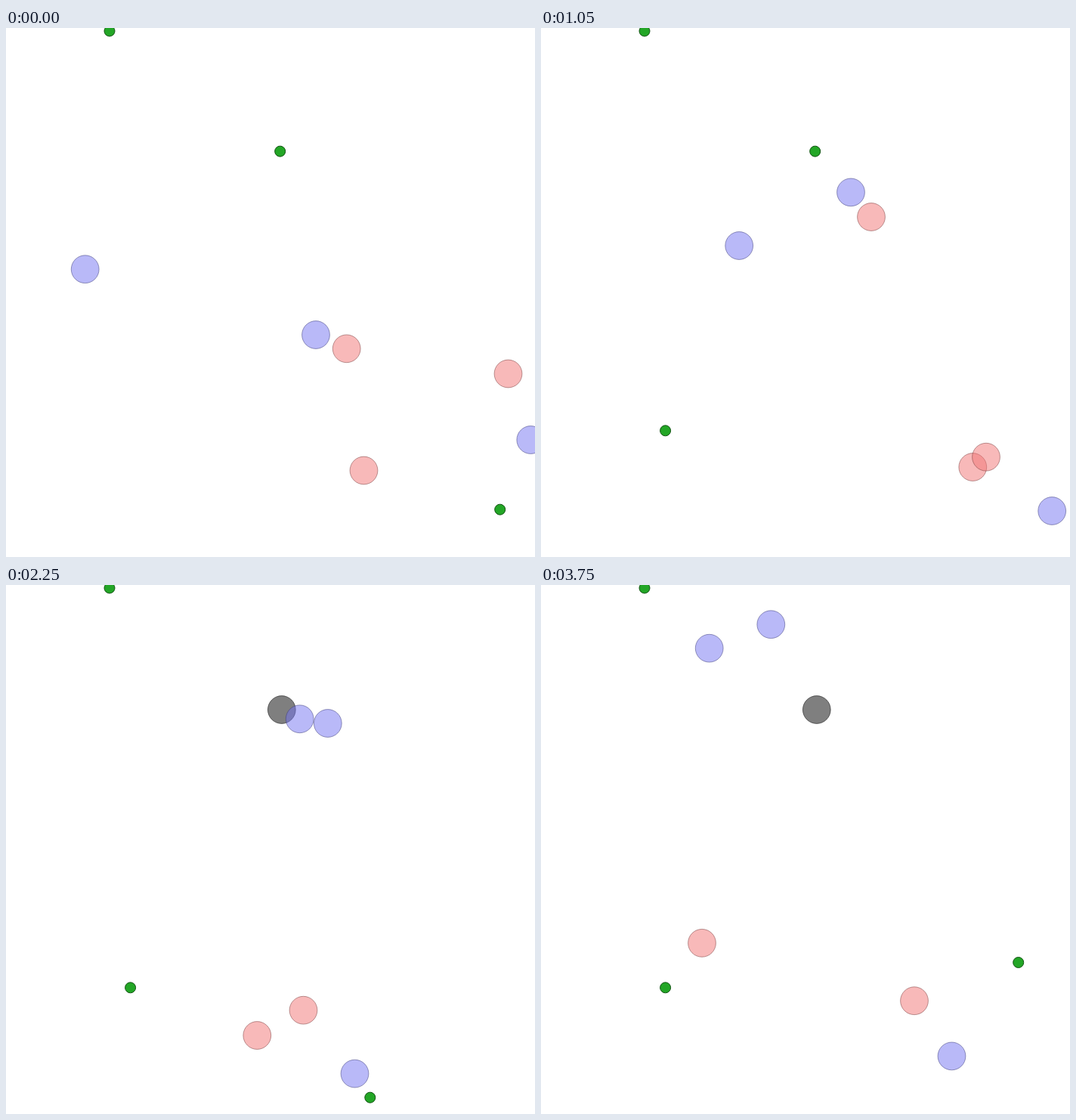
Recreate the animation shown at these times as an HTML page. Size 700x700 px, loop 3.9 s.

```html
<!DOCTYPE html>
<html lang="en">
<head>
<meta charset="utf-8">
<title>Agents and food</title>
<style>
html, body { margin: 0; width: 100%; height: 100%; overflow: hidden; background: #fff; }
svg { display: block; width: 100%; height: 100%; }
</style>
</head>
<body>
<svg id="stage" viewBox="0 0 700 700"></svg>
<script>
const STEP = 150, COUNT = 26, DRAG = 0.75;
const RED = [241, 117, 117], BLUE = [117, 117, 241], GREEN = [35, 166, 38], DEAD = [0, 0, 0];
const stage = document.getElementById('stage');

// Waypoints: [step, x, y]
const agents = [
  { color: RED, path: [[0, 473.5, 585.5], [4, 540, 589.5], [7, 571.3, 581], [11, 500, 580.5],
    [15, 393.5, 562.7], [21, 442.7, 563], [25, 494, 550.2]] },
  { color: RED, path: [[0, 664.5, 457.5], [4, 640.2, 523.5], [7, 589, 567.7], [11, 470.6, 590.3],
    [15, 332.3, 596], [21, 239, 526.7], [25, 213, 473.8]] },
  { color: RED, diesAt: 12, path: [[0, 450.7, 424.3], [4, 450, 333.2], [7, 437, 250], [11, 367, 179.7],
    [12, 364.8, 165]] },
  { color: BLUE, path: [[0, 104.7, 319.2], [4, 196.7, 319.2], [7, 262.2, 288], [11, 326.5, 210.7],
    [15, 388.7, 177.3], [21, 299.8, 141], [25, 222.7, 83.7]] },
  { color: BLUE, path: [[0, 410, 406], [4, 410, 314], [7, 410, 217.4], [9, 379, 178], [11, 386, 179.6],
    [15, 425.8, 183], [21, 390, 100.3], [25, 304.3, 52.2]] },
  { color: BLUE, path: [[0, 694.3, 545], [3, 694.3, 604.7], [4, 685.2, 627.5], [5, 678, 633.5], [7, 676.2, 639],
    [11, 590.7, 645], [15, 461.5, 646.6], [21, 492.3, 664.3], [25, 543.5, 623.4]] }
];

const foods = [
  { x: 137, y: 4, from: 0, to: COUNT },
  { x: 362.7, y: 163.2, from: 0, to: 9 },
  { x: 653.7, y: 637.2, from: 0, to: 5 },
  { x: 164.6, y: 532.8, from: 5, to: COUNT },
  { x: 440.3, y: 185.5, from: 9, to: 14 },
  { x: 481.8, y: 678.2, from: 14, to: 20 },
  { x: 631.7, y: 499.5, from: 20, to: COUNT }
];

const rgb = c => `rgb(${c.map(Math.round)})`;

function paint(el, color) {
  el.setAttribute('fill', rgb(color));
  el.setAttribute('stroke', rgb(color.map(v => v / 2)));
}

function disc(r, color, alpha) {
  const el = document.createElementNS('http://www.w3.org/2000/svg', 'circle');
  el.setAttribute('r', r);
  el.setAttribute('fill-opacity', alpha);
  el.setAttribute('stroke-opacity', alpha);
  paint(el, color);
  stage.appendChild(el);
  return el;
}

function place(el, x, y) {
  el.setAttribute('cx', x);
  el.setAttribute('cy', y);
}

// Damped motion along one axis, with a constant push between waypoints.
function travel(path, axis) {
  const out = [path[0][axis]];
  let v = 0;
  for (let i = 1; i < path.length; i++) {
    const n = path[i][0] - path[i - 1][0];
    const glide = DRAG * (1 - DRAG ** n) / (1 - DRAG);
    const reach = (n - glide) / (1 - DRAG);
    const push = (path[i][axis] - path[i - 1][axis] - v * glide) / reach;
    for (let k = 0; k < n; k++) {
      v = v * DRAG + push;
      out.push(out[out.length - 1] + v);
    }
  }
  return out;
}

for (const a of agents) {
  a.xs = travel(a.path, 1);
  a.ys = travel(a.path, 2);
  a.el = disc(18.4, a.color, 0.5);
}
for (const f of foods) {
  f.el = disc(7, GREEN, 1);
  place(f.el, f.x, f.y);
}

function draw(step) {
  for (const a of agents) {
    const i = Math.min(step, a.xs.length - 1);
    place(a.el, a.xs[i], a.ys[i]);
    paint(a.el, step >= a.diesAt ? DEAD : a.color);
  }
  for (const f of foods) {
    f.el.style.display = step >= f.from && step < f.to ? '' : 'none';
  }
}

let start;
function tick(now) {
  if (start === undefined) start = now;
  draw(Math.floor((now - start) / STEP) % COUNT);
  requestAnimationFrame(tick);
}
draw(0);
requestAnimationFrame(tick);
</script>
</body>
</html>
```
